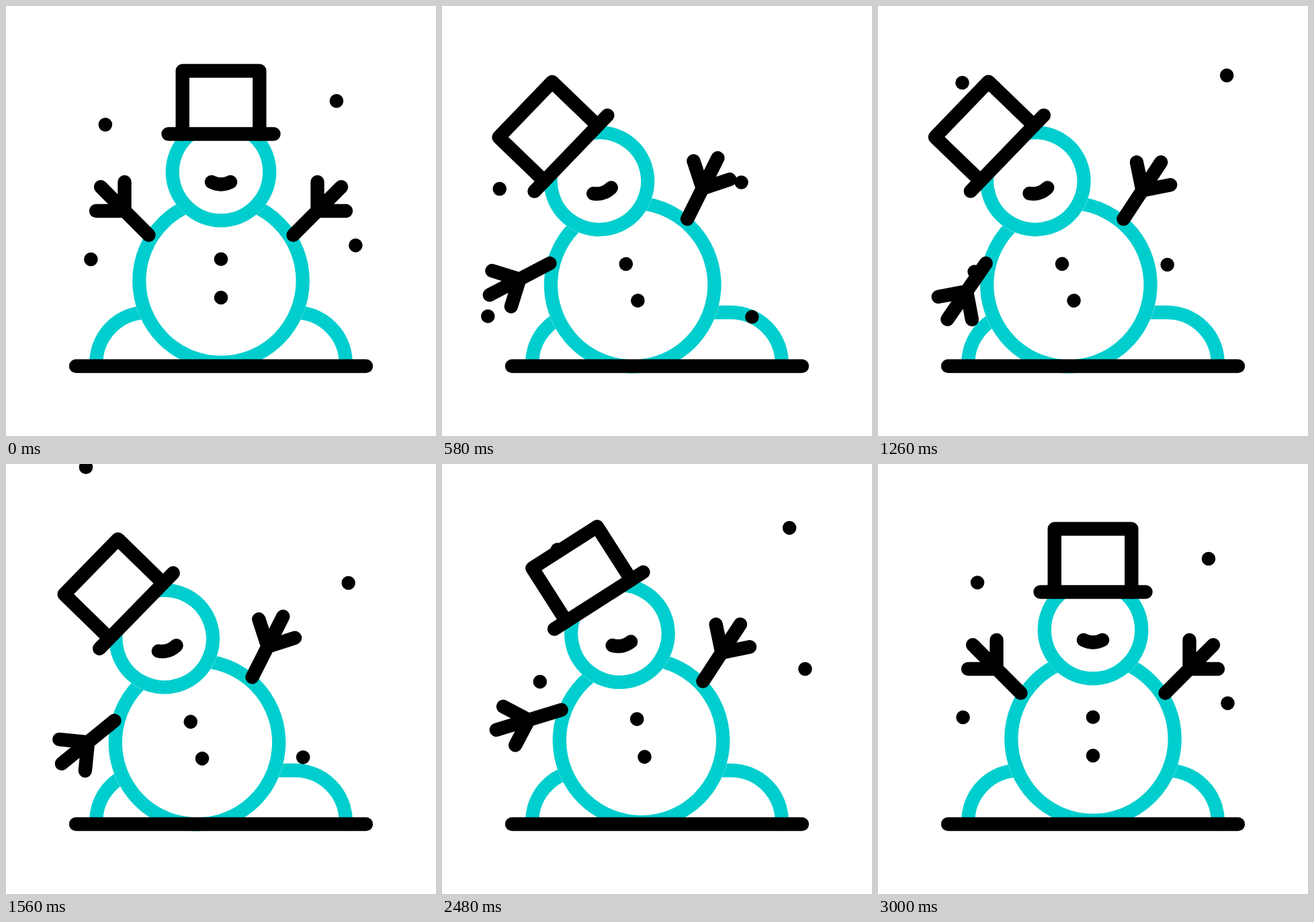
An HTML page that plays this animation: 640x640 px, repeating every 3140 ms.

```html
<!DOCTYPE html>
<html lang="en">
<head>
<meta charset="utf-8">
<title>Snowman</title>
<style>
  html, body { margin: 0; width: 100%; height: 100%; overflow: hidden; background: #fff; }
  svg { display: block; width: 100%; height: 100%; }
  .ink, .snow { fill: none; stroke-width: 20.4; stroke-linecap: round; stroke-linejoin: round; }
  .ink { stroke: #000; }
  .snow { stroke: #00cece; }
  .solid { fill: #fff; }
  .seam { fill: none; stroke: #fff; stroke-width: .6; opacity: .45; }
</style>
</head>
<body>
<svg viewBox="0 0 640 640">
  <path class="snow" d="M505.8 536V532A76 76 0 0 0 429.8 456H405"/>
  <path class="snow" d="M134.2 536V532A76 76 0 0 1 210.2 456H235"/>
  <g id="flakes"></g>
  <g id="body">
    <circle class="snow solid" cx="320" cy="409" r="121.8"/>
    <circle class="seam" cx="320" cy="409" r="132.1"/>
    <circle cx="320" cy="376.7" r="10.3"/>
    <circle cx="320" cy="434" r="10.3"/>
    <g id="head">
      <circle class="snow solid" cx="320" cy="247" r="72.3"/>
      <circle class="seam" cx="320" cy="247" r="82.6"/>
      <path class="ink" d="M306 262Q320 269 334 262"/>
      <g id="hat">
        <path class="ink solid" d="M262.7 190.5V96.5H377.3V190.5"/>
        <path class="ink" d="M241.5 190.5H398.5"/>
      </g>
    </g>
    <g id="leftArm"><path class="ink" d="M212.5 341L141 269.2M134 305H176.5V262"/></g>
    <g id="rightArm"><path class="ink" d="M427.5 341L499 269.2M506 305H463.5V262"/></g>
  </g>
  <path class="ink" d="M104 536H536"/>
</svg>
<script>
  const LOOP = 3140, REST = 3000, GROUND = 536;
  const $ = id => document.getElementById(id);
  const pose = (id, transform) => $(id).setAttribute("transform", transform);

  // Smooth step from 0 to 1 between two times.
  const ease = (t, from, to) => {
    const u = Math.min(1, Math.max(0, (t - from) / (to - from)));
    return u * u * (3 - 2 * u);
  };
  const wave = (t, period) => Math.sin(2 * Math.PI * t / period);
  const swing = (t, peak, period) => wave(t - peak + period / 4, period);

  const lean = t => -17.9 * ease(t, 0, 530) + 0.9 * ease(t, 1080, 2160) + 17 * ease(t, 2160, REST);
  const hop = t => 33.3 * (ease(t, 0, 305) - ease(t, 305, 560));
  const hatTilt = t => -28.2 * (ease(t, 270, 560) - ease(t, 2230, REST));
  const waving = t => ease(t, 0, 620) - ease(t, 2100, REST);
  const leftSwing = t => waving(t) * (-69 + 14 * swing(t, 1830, 1200));
  const rightSwing = t => waving(t) * (4.5 + 5 * swing(t, 2040, 960)) - 0.59 * hop(t);

  // From each spot one flake drifts down to the ground while another comes to rest there.
  // drop: fall in the first 320 ms, gain: its growth, drift and sway: periods, pace: speed of arrival.
  const spots = [
    { x: 148, y: 176.5, drop: 50.5, gain: 1.07, drift: 2580, sway: 1600, pace: 0.96 },
    { x: 492, y: 141, drop: 71, gain: 0.9, drift: 4400, sway: 1700, pace: 0.9 },
    { x: 126.5, y: 377, drop: 39, gain: 1.3, drift: 3100, sway: 1400, pace: 1.04 },
    { x: 520.5, y: 356, drop: 62, gain: 0.91, drift: 3000, sway: 1420, pace: 1 }
  ];

  const leave = (p, t) => [
    p.x - 63 * wave(t, p.drift),
    p.y + p.drop * (t / 320) ** p.gain
  ];

  function arrive(p, t) {
    const left = Math.max(0, REST - t);
    const gust = 53 * (left / 2040) ** 4;
    return [
      p.x + 27 * wave(left, p.sway) - gust,
      p.y - p.pace * (0.097 * left + 3 * gust)
    ];
  }

  const flakes = spots.flatMap(spot => [leave, arrive].map(path => {
    const dot = document.createElementNS("http://www.w3.org/2000/svg", "circle");
    $("flakes").append(dot);
    return { dot, at: t => path(spot, t) };
  }));

  function draw(t) {
    const lift = `translate(0 ${-hop(t)})`;
    pose("body", `rotate(${lean(t)} 320 527)`);
    pose("head", lift);
    pose("hat", `${lift} rotate(${hatTilt(t)} 315 247)`);
    pose("leftArm", `rotate(${leftSwing(t)} 212.5 341)`);
    pose("rightArm", `rotate(${rightSwing(t)} 427.5 341)`);
    for (const { dot, at } of flakes) {
      const [x, y] = at(t);
      dot.setAttribute("cx", x);
      dot.setAttribute("cy", y);
      dot.setAttribute("r", y < GROUND ? 10.3 : 0);
    }
  }

  const start = performance.now();
  function tick() {
    draw((performance.now() - start) % LOOP);
    requestAnimationFrame(tick);
  }
  tick();
</script>
</body>
</html>
```
